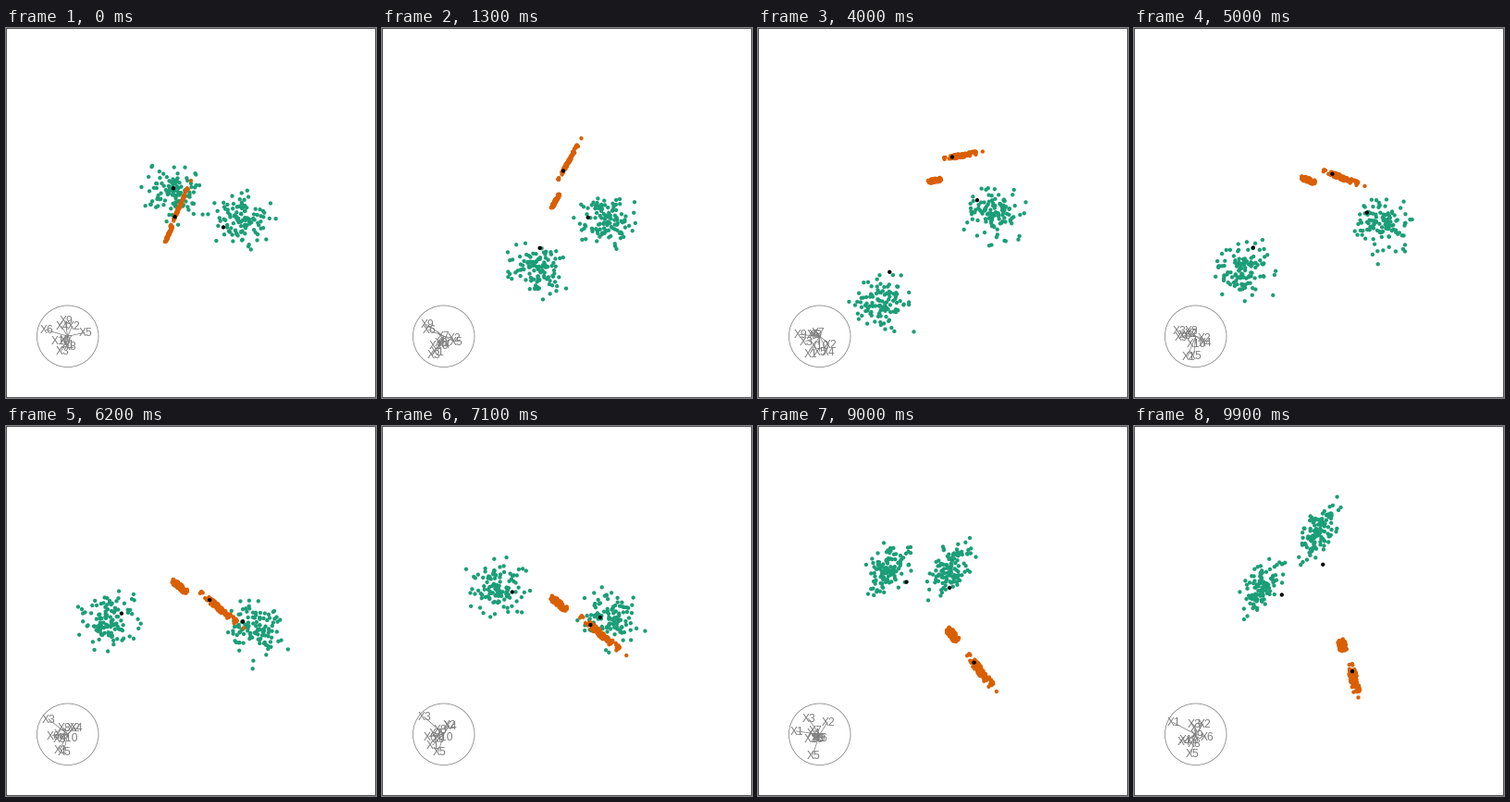
Recreate the animation shown at these times as a matplotlib script. Size 400 px wide and 400 px high, loop 10000 ms.

```python
import numpy as np
import matplotlib.pyplot as plt
from matplotlib.animation import FuncAnimation
from matplotlib.collections import LineCollection

SIZE, FRAMES, STEP = 400, 100, 100
END = (FRAMES - 1) * STEP / 1000
GREEN, ORANGE, GREY = "#1b9e77", "#d95f02", "#7f7f7f"
HUB, RADIUS = np.array([66.7, 333.3]), 33.3
COUNT = 112

# Key points of each route, evenly spaced in time
LEFT = [(181, 178), (160, 287), (134, 298), (110, 220), (137, 155), (138, 174)]
RIGHT = [(255, 207), (241, 208), (255, 200), (273, 220), (225, 189), (199, 115)]
LONG = [(188, 192), (208, 130), (220, 137), (230, 190), (241, 247), (238, 274)]
LEAD = [(4, -9), (5, -7), (7.5, -1.5), (8.3, 6.5), (8.5, 7.5), (1.5, 6.5)]
AXES = [
    [(-1, 9), (-12, 18), (-11, 15), (-25, -13)],
    [(5, -11), (11, 9), (6, -9), (8, -11)],
    [(-7, 16), (-15, 11), (-20, -16), (-3, -11)],
    [(-7, -11), (6, 18), (8, -9), (-14, 8)],
    [(19, -4), (1, 14), (-6, 18), (-5, 21)],
    [(-24, -7), (-7, -3), (-17, 3), (12, 3)],
    [(-3, 4), (-1, -4), (-9, 0), (0, -7)],
    [(1, 11), (-6, 0), (-4, -6), (-3, 10)],
    [(-3, -17), (-24, -3), (-8, 5), (0, 1)],
    [(-8, 5), (-3, 10), (-1, 3), (-8, 6)],
]


def glide(keys, t):
    """Smooth curve through evenly timed key points."""
    keys = np.asarray(keys, float)
    slope = np.gradient(keys, axis=0, edge_order=2)
    pos = t / END * (len(keys) - 1)
    i = min(int(pos), len(keys) - 2)
    s = pos - i
    ease = s * s * (3 - 2 * s)
    return (keys[i] + ease * (keys[i + 1] - keys[i])
            + s * (1 - s) ** 2 * slope[i] - s * s * (1 - s) * slope[i + 1])


def smoothstep(s):
    s = np.clip(s, 0, 1)
    return s * s * (3 - 2 * s)


def sample(rng, limit):
    z = np.clip(rng.normal(size=(COUNT, 2)), -limit, limit)
    return (z - z.mean(0)) / z.std(0)


rng = np.random.default_rng(7)
round_near = [sample(rng, 2.4) for _ in range(2)]
round_far = [sample(rng, 2.4) for _ in range(2)]
long_z, short_z = sample(rng, 1.9), sample(rng, 1.9)
long_z[0] = 3, 0  # the lone point ahead of the long cluster


def axis_tips(t):
    """Nearest orthonormal pair of directions, scaled to the circle."""
    basis = np.array([glide(keys, t) for keys in AXES])
    u, _, v = np.linalg.svd(basis, full_matrices=False)
    return HUB + RADIUS * u @ v


def points(t):
    left, right, long = (glide(keys, t) for keys in (LEFT, RIGHT, LONG))
    short = 2 * SIZE - left - right - long  # the data stay centred

    # Round clusters slim down and lean over towards the end
    lean = smoothstep((t - 7) / 2.9)
    blob = np.array([[14 - 4 * lean, -9 * lean], [0, 13 - lean]])
    turn = 0.4 * t
    greens = [c + (np.cos(turn) * a + np.sin(turn) * b) @ blob
              for c, a, b in zip((left, right), round_near, round_far)]

    # Flat clusters share a direction and slowly thicken
    lead = glide(LEAD, t)
    side = np.array([-lead[1], lead[0]]) / np.hypot(*lead) * (0.4 + 0.16 * t)
    oranges = [long + long_z @ [lead, side], short + short_z @ [0.44 * lead, side]]

    marks = [left + [2.2 * t, -11 - 25 * np.cos(0.57 * (t - 3.2))],
             right + [0.026 * t ** 3 - 20, 1.4 * (t - 4) ** 2 - 14],
             long - 1.35 * lead]
    return np.vstack(greens + oranges + [marks])


fig = plt.figure(figsize=(4, 4), dpi=100, facecolor="white")
ax = fig.add_axes([0, 0, 1, 1])
ax.set(xlim=(0, SIZE), ylim=(SIZE, 0))
ax.axis("off")

px = 0.72  # points per pixel
ax.add_patch(plt.Rectangle((0, 0), SIZE, SIZE, fill=False, ec="#555555", lw=2 * px, snap=False))
ax.add_patch(plt.Circle(HUB, RADIUS, fill=False, ec=GREY, lw=0.75 * px))
spokes = ax.add_collection(LineCollection([], colors=GREY, linewidths=0.75 * px))
labels = [ax.text(*HUB, f"X{i + 1}", color=GREY, family="Liberation Sans",
                  size=12 * px, ha="center", va="center") for i in range(len(AXES))]
colors = [GREEN] * (2 * COUNT) + [ORANGE] * (2 * COUNT) + ["black"] * 3
dots = ax.scatter(*points(0).T, s=(4.3 * px) ** 2, c=colors, linewidths=0, zorder=4)


def update(frame):
    t = frame * STEP / 1000
    tips = axis_tips(t)
    spokes.set_segments([[HUB, tip] for tip in tips])
    for label, tip in zip(labels, tips):
        label.set_position(tip + 1)
    dots.set_offsets(points(t))
    return [spokes, dots, *labels]


anim = FuncAnimation(fig, update, frames=FRAMES, interval=STEP, repeat=True, repeat_delay=0)
plt.show()
```
